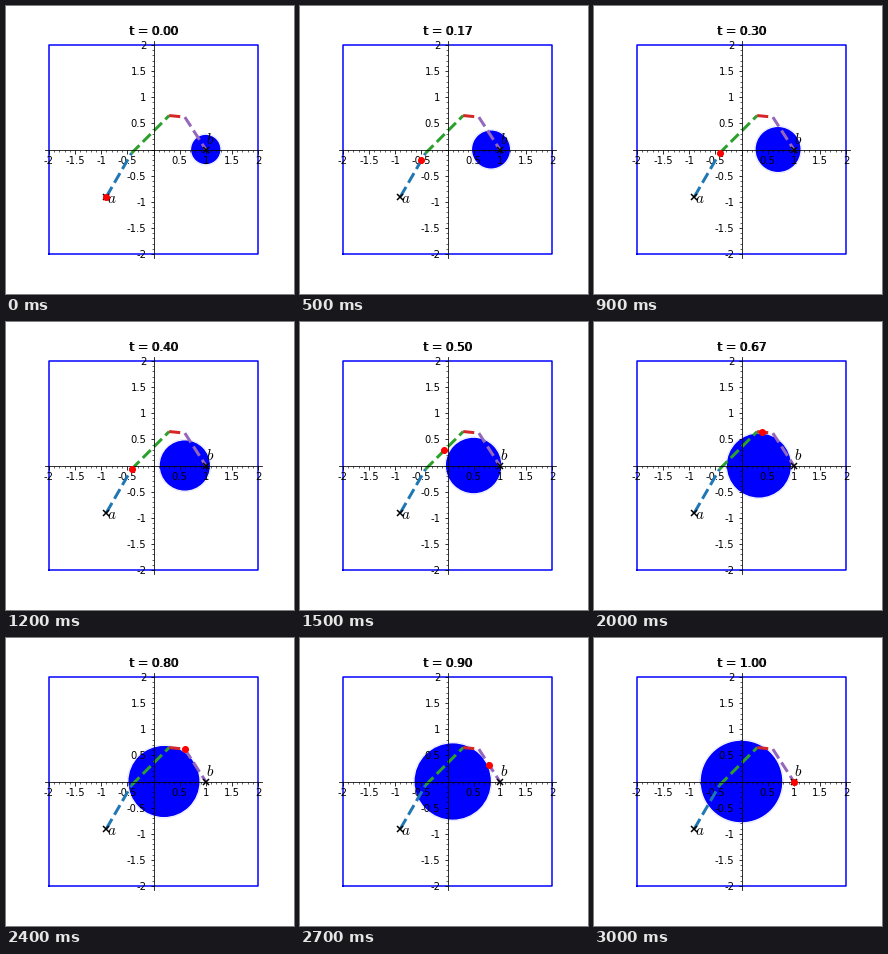
A matplotlib script for the animation above (3.1 s loop, 288 px wide and 288 px high).

```python
import numpy as np
import matplotlib.pyplot as plt
from matplotlib.animation import FuncAnimation
from matplotlib.patches import Circle
from matplotlib.ticker import FuncFormatter, MultipleLocator

SIZE = 288
FRAMES = 31
PX_PER_UNIT = 52.25
ORIGIN = (147.5, SIZE - 143.5)
LIMIT = 2.08

plt.rcParams.update({"font.family": "DejaVu Sans", "font.size": 10,
                     "mathtext.fontset": "cm"})

# The second leg has no length: the point waits there.
STOPS = np.array([(-0.9, -0.9), (-0.42, -0.07), (-0.42, -0.07),
                  (0.3, 0.65), (0.6, 0.62), (1.0, 0.0)])
TIMES = np.linspace(0, 1, len(STOPS))


def position(t):
    return [np.interp(t, TIMES, STOPS[:, k]) for k in (0, 1)]


def tick_text(value, _):
    return "" if abs(value) < 1e-9 else f"{value:g}"


fig = plt.figure(figsize=(4, 4), dpi=72, facecolor="white")
half = LIMIT * PX_PER_UNIT
ax = fig.add_axes([(ORIGIN[0] - half) / SIZE, (ORIGIN[1] - half) / SIZE,
                   2 * half / SIZE, 2 * half / SIZE])
ax.set(xlim=(-LIMIT, LIMIT), ylim=(-LIMIT, LIMIT))
ax.patch.set_visible(False)

for side in ("left", "bottom"):
    ax.spines[side].set_position("zero")
for side in ("right", "top"):
    ax.spines[side].set_visible(False)
for axis in (ax.xaxis, ax.yaxis):
    axis.set_major_locator(MultipleLocator(0.5))
    axis.set_minor_locator(MultipleLocator(0.1))
    axis.set_major_formatter(FuncFormatter(tick_text))

ax.plot([-2, 2, 2, -2, -2], [-2, -2, 2, 2, -2], color="blue", lw=1.5, zorder=1)
rim = ax.add_patch(Circle((1, 0), 0.3, fill=False, ec="#d8d8ff", lw=0.5, zorder=1))
disk = ax.add_patch(Circle((1, 0), 0.28, fc="blue", ec="none", zorder=1))

for i, (start, end) in enumerate(zip(STOPS[:-1], STOPS[1:])):
    if not np.allclose(start, end):
        ax.plot(*zip(start, end), "--", color=f"C{i}", lw=3, zorder=2)

for point, name, shift in ((STOPS[0], "$a$", (0.1, -0.03)),
                           (STOPS[-1], "$b$", (0.08, 0.2))):
    ax.plot(*point, "x", color="black", ms=6, mew=1.5, zorder=4)
    ax.text(*(point + shift), name, fontsize=15, ha="center", va="center", zorder=4)

dot, = ax.plot([], [], "o", color="red", ms=6, mew=1, zorder=5)

# Two overlapping copies give the title its heavy look.
titles = [fig.text((147.5 + dx) / SIZE, (SIZE - 29) / SIZE, "", fontsize=12,
                   ha="center", va="baseline") for dx in (0, 1)]


def update(frame):
    t = frame / (FRAMES - 1)
    x, y = position(t)
    dot.set_data([x], [y])
    for circle, base in ((disk, 0.28), (rim, 0.3)):
        circle.center = (1 - t, 0)
        circle.set_radius(base + 0.5 * t)
    for title in titles:
        title.set_text(f"t = {t:.2f}")
    return [dot, disk, rim, *titles]


anim = FuncAnimation(fig, update, frames=FRAMES, interval=100,
                     repeat=True, repeat_delay=0, blit=False)
plt.show()
```
